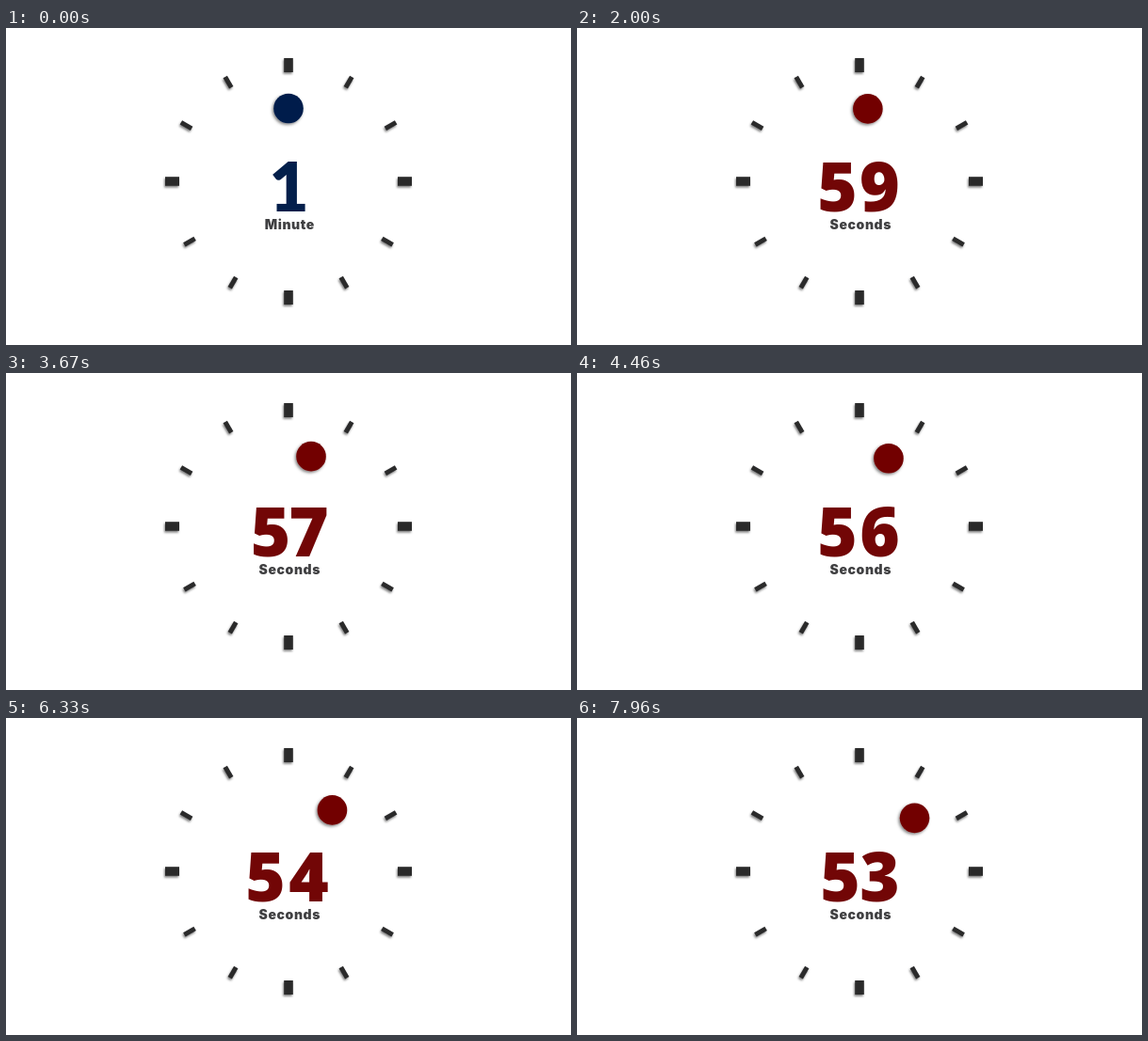
An HTML page for the animation above (8 s loop, 600 by 337 pixels).

```html
<!DOCTYPE html>
<html lang="en">
<head>
<meta charset="utf-8">
<title>One minute countdown</title>
<style>
  html, body { margin: 0; width: 100%; height: 100%; overflow: hidden; background: #fff; }
  svg { display: block; width: 100vw; height: 100vh; }
  text { text-anchor: middle; }
  .digit { font: 800 72.5px "Open Sans", sans-serif; }
  .slab .digit { font: 900 72.5px Lato, sans-serif; }
  #label { font: 900 14px Inter, sans-serif; letter-spacing: .6px; fill: #404042; }
</style>
</head>
<body>
<svg viewBox="0 0 600 337">
  <defs>
    <filter id="soft" x="-50%" y="-50%" width="200%" height="200%">
      <feDropShadow dx="-0.9" dy="1.8" stdDeviation="1.1" flood-color="#000" flood-opacity=".5"/>
    </filter>
    <filter id="glow" x="-50%" y="-50%" width="200%" height="200%">
      <feDropShadow dx="-1.3" dy="1.6" stdDeviation="1.4" flood-color="#000" flood-opacity=".5"/>
    </filter>
  </defs>
  <g id="ticks" fill="#2a2a2b"></g>
  <circle id="dot" r="15.8" filter="url(#glow)"/>
  <g id="number"><text class="digit" y="195"></text><text class="digit" y="195"></text></g>
  <text id="label" x="301.3" y="214"></text>
</svg>
<script>
const LOOP = 8000, START = 1040;
const BLUE = '#031f4b', RED = '#720606';
const WIDTHS = { 1: 35, 3: 37, 4: 45, 5: 37, 6: 43, 7: 34, 8: 43, 9: 43 };
const GAP = 5, MID = 300.5;
const $ = id => document.getElementById(id);
const dot = $('dot'), label = $('label'), number = $('number');
const digits = [...number.children];

function addTick(x, y, w, h, turn) {
  const holder = document.createElementNS('http://www.w3.org/2000/svg', 'g');
  const rect = document.createElementNS('http://www.w3.org/2000/svg', 'rect');
  const attrs = { x: x - w / 2, y: y - h / 2, width: w, height: h, transform: `rotate(${turn} ${x} ${y})` };
  for (const key in attrs) rect.setAttribute(key, attrs[key]);
  holder.setAttribute('filter', 'url(#soft)');
  holder.append(rect);
  $('ticks').append(holder);
}

for (let i = 0; i < 4; i++) {
  const a = i * Math.PI / 2;
  addTick(300 + 123.5 * Math.sin(a), 163 - 123.5 * Math.cos(a), 9.6, 15, i * 90);
}
for (const [dx, dy, turn] of [[64, -105.3, 30], [108.5, -59.3, 60], [105, 64.2, 120], [59, 107.7, 150]]) {
  addTick(300 + dx, 163 + dy, 5, 13, turn);
  addTick(300 - dx, 163 + dy, 5, 13, -turn);
}

function showNumber(value) {
  const chars = [...String(value)];
  const total = chars.reduce((sum, c) => sum + WIDTHS[c], GAP * (chars.length - 1));
  let left = MID - total / 2;
  digits.forEach((el, i) => {
    const c = chars[i] || '';
    el.textContent = c;
    if (!c) return;
    el.setAttribute('x', left + WIDTHS[c] / 2);
    left += WIDTHS[c] + GAP;
  });
}

function draw(t) {
  const running = t >= START;
  const sec = Math.max(0, t - START) / 1000;
  const angle = sec * Math.PI / 30;
  const color = running ? RED : BLUE;
  dot.setAttribute('cx', 300 + 88.3 * Math.sin(angle));
  dot.setAttribute('cy', 85.5 + 83 * (1 - Math.cos(angle)));
  dot.setAttribute('fill', color);
  number.setAttribute('fill', color);
  number.setAttribute('class', running ? '' : 'slab');
  showNumber(running ? 59 - Math.floor(sec) : 1);
  label.textContent = running ? 'Seconds' : 'Minute';
}

function frame() {
  draw(performance.now() % LOOP);
  requestAnimationFrame(frame);
}
frame();
</script>
</body>
</html>
```
